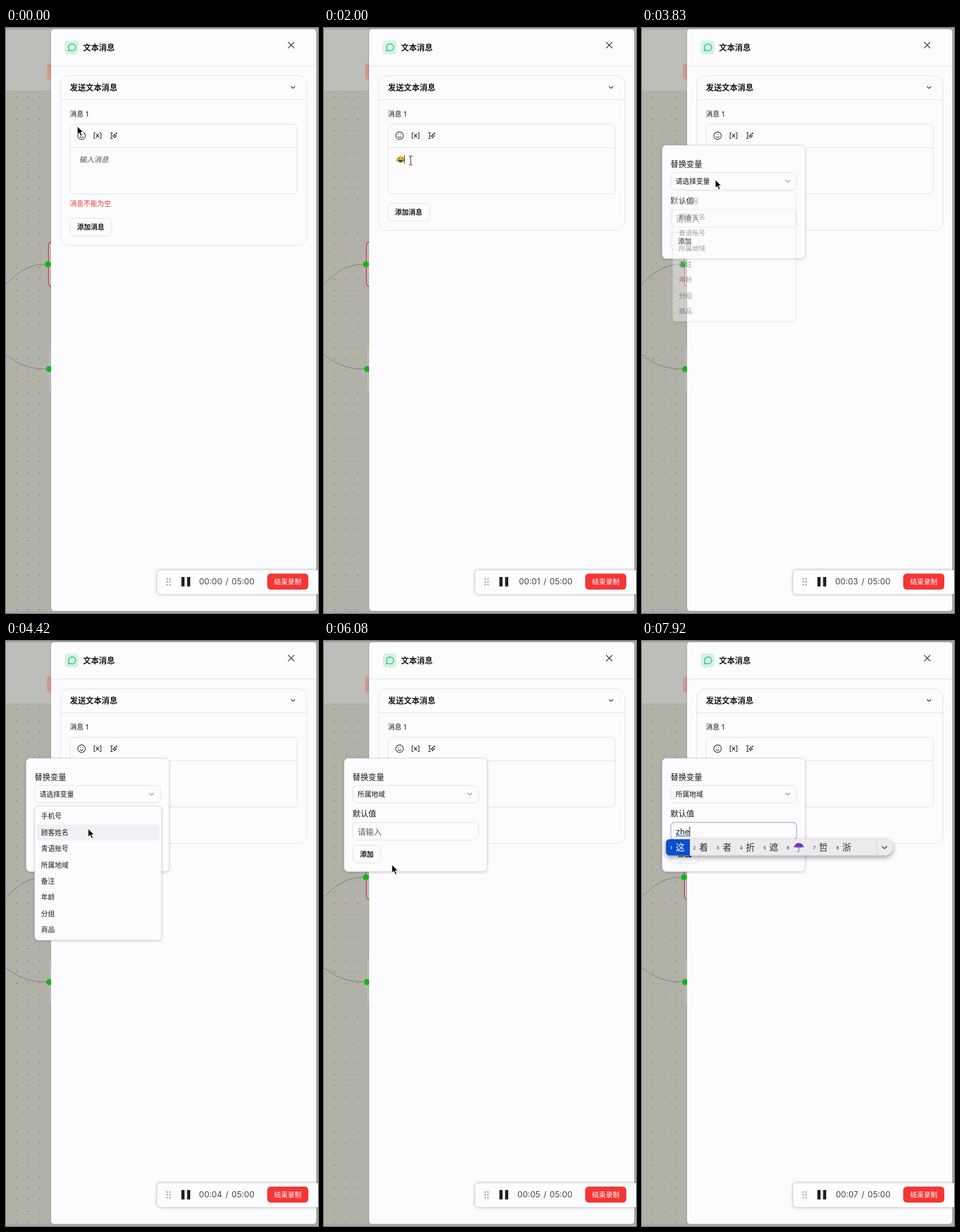
Recreate the animation shown at these times as an HTML page. Size 547x1024 px, loop 8 s.

```html
<!DOCTYPE html>
<html lang="zh">
<head>
<meta charset="utf-8">
<title>文本消息</title>
<style>
  html, body { margin: 0; width: 100%; height: 100%; overflow: hidden; background: #a9a9a9; }
  svg { display: block; width: 100vw; height: 100vh; }
  text { font-family: Inter, "Noto Sans CJK SC", "Noto Sans CJK", sans-serif; font-size: 12px; fill: #18181b; }
  .bold { font-weight: 600; }
  .mid { font-weight: 500; }
  .big { font-size: 13.9px; }
  .line { fill: none; stroke: #e0e0e7; }
  .box { fill: #fcfcfe; stroke: #dedee6; }
  .ink { fill: none; stroke: #27272a; stroke-width: 1.2; stroke-linecap: round; stroke-linejoin: round; }
  .hover { fill: #efeff3; }
  .pop { filter: drop-shadow(0 1px 2px #0003); }
  .caret { stroke: #111; }
</style>
</head>
<body>
<svg viewBox="0 0 547 1024" preserveAspectRatio="none">
  <defs>
    <clipPath id="gridClip"><rect x="56" y="219" width="134" height="200"/></clipPath>
    <clipPath id="barClip"><path d="M48 347H425.5a14.3 14.3 0 0 1 0 28.6H48a6 6 0 0 1-6-6V353a6 6 0 0 1 6-6Z"/></clipPath>
  </defs>

  <!-- canvas behind the panel -->
  <rect width="547" height="1024" fill="#a9a9a9"/>
  <rect y="3" width="82" height="106" fill="#bdbdb9"/>
  <rect y="109" width="82" height="911" fill="#b2b1a8"/>
  <rect x="72" y="62" width="10" height="28" rx="4" fill="#d0988e"/>
  <g id="dots" fill="#55554f"></g>
  <path d="M-12 459C18 432 32 413.5 72 413.5M-12 563C18 586 34 597 74 597" fill="none" stroke="#77777b"/>
  <rect x="76" y="556" width="10" height="82" rx="4" fill="#bebebb"/>
  <rect x="74.5" y="374.5" width="20" height="78" rx="6" fill="#c2c2c0" stroke="#cf2430" stroke-width="1.3"/>
  <circle cx="73.5" cy="413.5" r="5.2" fill="#0cb814"/>
  <circle cx="75.5" cy="597" r="5.2" fill="#0cb814"/>

  <!-- panel -->
  <rect x="79" y="2" width="465" height="1018.5" rx="5" fill="#fcfcfe" style="filter:drop-shadow(0 0 1px #0005)"/>
  <path class="line" d="M79 66.5H544"/>
  <rect x="103" y="22" width="24" height="24" rx="5" fill="#d2f4e3"/>
  <path d="M109.3 40.2l1-3.2a6.4 6.1 0 1 1 2.3 2.2Z" fill="none" stroke="#1fae6c" stroke-width="1.2" stroke-linejoin="round"/>
  <text class="bold big" x="135" y="39">文本消息</text>
  <path class="ink" d="M495 25l10 10m0-10l-10 10"/>

  <rect id="card" class="line" x="95.5" y="83.5" width="432" height="297" rx="15"/>
  <path class="line" d="M96 125.5H527"/>
  <text class="bold big" x="112" y="109">发送文本消息</text>
  <path class="ink" d="M500 102.5l3.2 3.2 3.2-3.2"/>
  <text x="112" y="155">消息 1</text>
  <rect class="line" x="112.5" y="168.5" width="398" height="122" rx="6"/>
  <path class="line" d="M113 209.5H510"/>
  <rect id="hoverFace" class="hover" x="120" y="176.500" width="25" height="24" rx="4"/>
  <rect id="hoverVar" class="hover" x="148" y="176.500" width="25" height="24" rx="4"/>
  <g class="ink">
    <circle cx="132.500" cy="188.500" r="6.600"/>
    <path d="M129.800 190.200q2.700 3 5.400 0M130.500 186.400v.2M134.500 186.400v.2"/>
    <path d="M156.500 183.500h-2v10h2M164.500 183.500h2v10h-2M158.300 186l4.400 5M162.700 186l-4.400 5"/>
    <path d="M183 183.500h4M183 193.500h4M185 183.500v10M190.500 185.500q.5 3 3.500 3.500q-3 .5-3.500 3.500q-.5-3-3.500-3.500q3-.5 3.500-3.500ZM193.500 183.300v2.400M192.300 184.500h2.400"/>
  </g>
  <text id="hint" x="128" y="235" font-style="italic" style="font-size:13px;fill:#55555c">输入消息</text>
  <g id="sent" transform="translate(134.300 230.200)"></g>
  <path id="caretA" class="caret" d="M0 222.500v15"/>
  <text id="error" x="112" y="312" style="fill:#ee2f2f">消息不能为空</text>
  <g id="addRow">
    <rect class="box" x="112.500" y="333" width="73" height="31" rx="7"/>
    <text class="bold" x="124.500" y="353">添加消息</text>
  </g>

  <g id="tip">
    <rect x="-15.500" y="151" width="31" height="24.500" rx="4" fill="#26262a"/>
    <text id="tipText" class="mid" y="167.500" text-anchor="middle" style="font-size:11px;fill:#fff">变量</text>
  </g>

  <!-- emoji picker -->
  <g id="picker">
    <rect class="box pop" x="44.500" y="205.500" width="176" height="228" rx="7"/>
    <rect id="cell" width="24" height="24" rx="4" fill="#e2e2e5"/>
    <g id="grid" clip-path="url(#gridClip)"></g>
    <path class="line" d="M191.500 220V419M206.500 220V419" stroke-width=".8"/>
    <rect x="195" y="225" width="8" height="82" rx="4" fill="#68686a"/>
  </g>

  <!-- variable form -->
  <g id="form">
    <rect class="box pop" x="35.500" y="205.500" width="250.500" height="198" rx="7"/>
    <text class="mid big" x="50" y="243">替换变量</text>
    <rect class="box" x="50.500" y="253" width="220.500" height="30.500" rx="7"/>
    <text id="choice" x="59" y="273">请选择变量</text>
    <path class="ink" d="M252 266.500l3.400 3.400 3.400-3.400" style="stroke:#8a8a90"/>
    <text class="mid big" x="50" y="307">默认值</text>
    <rect id="field" class="box" x="50.500" y="317.500" width="220.500" height="31" rx="7"/>
    <text id="ask" x="59" y="338.500" style="font-size:14px;fill:#5d5d66">请输入</text>
    <text id="typed" x="59" y="338.500" style="font-size:14px"></text>
    <path id="under" d="M59 341.300h0" stroke="#2a66e0" stroke-width="1.400"/>
    <path id="caretB" class="caret" d="M0 325v17"/>
    <rect class="box" x="50.500" y="357.500" width="49" height="31" rx="7"/>
    <text class="bold" x="63" y="377.500">添加</text>
  </g>

  <g id="list">
    <rect class="box pop" x="50.500" y="289" width="222" height="234.500" rx="6"/>
    <rect id="row" x="54" width="215" height="28" rx="4" fill="#f1f1f5"/>
  </g>

  <!-- input method bar -->
  <g id="ime">
    <g style="filter:drop-shadow(0 3px 5px #0006)">
      <g clip-path="url(#barClip)">
        <rect x="42" y="347" width="398" height="29" fill="#ebebed"/>
        <rect x="42" y="347" width="42" height="29" fill="#0a4fcd"/>
      </g>
    </g>
    <path d="M411.500 347V376" stroke="#d6d6d8"/>
    <path class="ink" d="M421 359.500l4.200 4 4.200-4"/>
  </g>

  <!-- recorder -->
  <rect x="265" y="949" width="300" height="42" rx="6" fill="#fdfdff" style="filter:drop-shadow(0 0 2.500px #5558)"/>
  <path d="M282.500 964.500v.01M287.500 964.500v.01M282.500 969.500v.01M287.500 969.500v.01M282.500 974.500v.01M287.500 974.500v.01" stroke="#55555a" stroke-width="2" stroke-linecap="round"/>
  <path d="M307.500 961h5.500v16.500h-5.500ZM317.500 961h5.500v16.500h-5.500Z" fill="#1f1f23"/>
  <g style="--c:#47474c" text-anchor="end">
    <text id="clock" x="379" y="974" style="font-size:14.400px;fill:var(--c)">00:00</text>
    <text x="390" y="974" style="font-size:14.400px;fill:var(--c)">/</text>
    <text x="435.500" y="974" style="font-size:14.400px;fill:var(--c)">05:00</text>
  </g>
  <rect x="458" y="955" width="72" height="28" rx="6" fill="#f43636"/>
  <text class="mid" x="470" y="973.500" style="fill:#fff">结束录制</text>

  <g id="cursor" stroke-linejoin="round">
    <path id="arrow" d="M0 0V14.500L3.400 11.500 6 17.300 8.500 16.200 6 10.500H10.600Z" fill="#050505" stroke="#fff"/>
    <path id="hand" d="M-1.800 1.300Q-1.300-.7 .4-.2Q1.400 .2 1.700 1.700L2.700 6Q4 4.700 5 6.300Q6.700 5.400 7.300 7.100Q9 6.600 9.500 8.600L10 12Q10 14 8.600 17H1.500Q-.8 13.500-4.300 11.200Q-5.500 9.300-3.400 8.700Q-2 8.600-.4 9.900ZM3.400 11v3.500M5.500 11v3.500M7.500 11v3.500" fill="#fff" stroke="#111" stroke-width="1.100"/>
    <g id="beam" fill="none">
      <path d="M-3-8Q0-8 0-6Q0-8 3-8M0-6V6M-3 8Q0 8 0 6Q0 8 3 8" stroke="#fff" stroke-width="2.400"/>
      <path d="M-3-8Q0-8 0-6Q0-8 3-8M0-6V6M-3 8Q0 8 0 6Q0 8 3 8" stroke="#111"/>
    </g>
  </g>
</svg>

<script>
const $ = id => document.getElementById(id);
const add = (id, markup) => $(id).insertAdjacentHTML('beforeend', markup);
const show = (id, on) => $(id).style.display = on ? '' : 'none';

// small drawing helpers
const fill = (d, c) => `<path d="${d}" fill="${c}"/>`;
const stroke = (d, c = '#5d3513', w = 1.1) =>
  `<path d="${d}" fill="none" stroke="${c}" stroke-width="${w}" stroke-linecap="round"/>`;
const dot = (x, y, r, c) => `<circle cx="${x}" cy="${y}" r="${r}" fill="${c}"/>`;
const face = (extra, c = '#fcc433') => dot(0, 0, 6.6, c) + extra;
const eyes = stroke('M-2.400-1.800v.6M2.400-1.800v.6', undefined, 1.700);
const grin = fill('M-4 .8H4Q3.400 4.800 0 4.800T-4 .8Z', '#6b3514');
const smile = stroke('M-3 2Q0 5 3 2');
const frown = stroke('M-2.500 4Q0 1.500 2.500 4');
const hand = (turn, fingers) => `<g transform="rotate(${turn})">` + stroke(fingers, '#f9ba2c', 2.500) +
  '<rect x="-4" y="-1.500" width="8" height="7.500" rx="3" fill="#fdbf35"/>' +
  stroke('M-2 2.500Q1 .5 3 2.500', '#d88b18', .9) + '</g>';
const four = 'M-3 0V-4.600M-1 0V-6M1 0V-5.800M3 0V-4.400';
const point = 'M-1.500 0V-6';
const knuckles = 'M-3-1.500V-2M-1-2V-2.600M1-2V-2.600M3-1.500V-2';

const emoji = [
  face(stroke('M-4-1.500Q-2.700-3.400-1.400-1.500M1.400-1.500Q2.700-3.400 4-1.500') + grin + dot(-5.5, 1.2, 1.9, '#43a9ee') + dot(5.5, 1.2, 1.9, '#43a9ee')),
  face(dot(-3, -2, 2.3, '#ee2f3f') + dot(3, -2, 2.3, '#ee2f3f') + grin),
  face(eyes + smile + dot(-5, 2.5, 2, '#f0475c') + dot(4.5, 4, 2, '#f0475c') + dot(4, -5, 2, '#f0475c')),
  face(fill('M-6.500-3H6.500L5 .8H1.200L0-1.500-1.200 .8H-5Z', '#222') + smile),
  face(dot(-3, -1.8, 2.3, '#e8612c') + dot(3, -1.8, 2.3, '#e8612c') + grin),
  face(stroke('M-4-1.500h2.500M1.500-1.500h2.500') + fill('M-1.600 1.500h3.200v3.500h-3.200Z', '#6b3514') + stroke('M-3.300 0V5.500M3.300 0V5.500', '#43a9ee', 2)),
  face(stroke('M-4-2.500L-1.500-1M4-2.500L1.500-1') + eyes + frown, '#f1592a'),
  face(eyes + dot(0, 3, 1.6, '#6b3514') + fill('M-6-3Q-7-7-3-6.500Q0-9 3-6.500Q7-7 6-3L3-4 0-2.500-3-4Z', '#b06a3c')),
  face(eyes + fill('M-3.500 1.500h7v2.500h-7Z', '#fff') + dot(0, -5, 2, '#b9e4ff'), '#4ba5ee'),
  face(fill('M-6-2.500A6.500 6.500 0 0 1 6-2.500Z', '#5a83d6') + dot(-2.5, -1, 1.5, '#fff') + dot(2.5, -1, 1.5, '#fff') + dot(0, 3.5, 1.8, '#6b3514') + stroke('M-5.500 2V6M5.500 2V6', '#e9a11e', 2)),
  face(stroke('M-4-2.500l2.400 .8M1.500-1.500h2') + dot(-4, 2, 1.6, '#f08a5a') + dot(4, 2, 1.6, '#f08a5a') + stroke('M-2.500 3.500q1.500-2 2.500 0t2.500 0')),
  face(fill('M-6-2L-6.500-7.500-2-5.500ZM6-2L6.500-7.500 2-5.500Z', '#7a3f9e') + stroke('M-4-2.500L-1.500-1M4-2.500L1.500-1', '#35134d') + stroke('M-3 2Q0 5 3 2', '#35134d'), '#8e4fb5'),
  fill('M-4.500 6V-2A4.500 4.500 0 0 1 4.500-2V6L2 4.500 0 6.500-2 4.500Z', '#d5d5dc') + stroke('M-4 1l-2-1.500M4 1l2-1.500', '#d5d5dc', 2) + dot(-1.6, -2, 1, '#333') + dot(1.6, -2, 1, '#333') + dot(0, 1.5, 1.5, '#a33'),
  fill('M0-6.500Q6-6.500 5.500-1 5 4 0 6.500-5 4-5.500-1-6-6.500 0-6.500Z', '#a5b3b0') + fill('M-4.500-1.500Q-1-1-1 2-4 2-4.500-1.500ZM4.500-1.500Q1-1 1 2 4 2 4.500-1.500Z', '#151515'),
  '<rect x="-5.500" y="-4.500" width="11" height="10.500" rx="2.500" fill="#6d9a9c"/>' + dot(0, -5.5, 1.5, '#d0524a') + dot(-2.5, -1, 1.5, '#e9f6f5') + dot(2.5, -1, 1.5, '#e9f6f5') + fill('M-3 2.500h6v1.500h-6Z', '#304a4c'),
  hand(-30, four) + stroke('M-5-5l-1-1M0-6.500V-7M4-5.500l1-1', '#555', .8),
  hand(0, 'M-1.500 0L.5-5.600'), hand(180, 'M1.500 0L-.5-5.600'), hand(0, knuckles), hand(10, knuckles),
  hand(90, knuckles), hand(0, 'M-1 0L1-6M1 0L-.5-5.500'), hand(0, 'M-1.500 0L-3-6M1.500 0L3-6'),
  hand(10, 'M-3 0V-6M3 0V-5M-4 3L-6 1'), hand(0, 'M-3 0V-6M3 0V-5.500'),
  hand(-90, point), hand(90, point), hand(0, point), hand(180, point), hand(12, point),
  hand(0, four), hand(0, 'M-3 0L-4.500-4.500M-1 0L-1.500-6M1 0L1.500-6M3 0L5-4.500M-4 3L-6 1'),
  hand(0, 'M-3 0L-4-4.500M-1 0L-2.500-6M1 0L2.500-6M3 0L4-4.500'),
  hand(-25, four + 'M-4 3L-6 1'), hand(15, 'M-3 0L-5-4M4 1L6-3'),
  stroke('M-3.500-4.500L-4.500 2.500H4', '#55595f', 4), stroke('M-2-4L1 0V5', '#666a70', 2.800),
  stroke('M-2-4L1.500 0 0 5', '#f7b42c', 3), hand(0, 'M-2 0V-3M2 0V-3'),
  fill('M-6 2Q-7-3-3-4.500 2-7 5.500-2.500 8 2 4 3.500-2 5-6 2Z', '#ea8da0') + stroke('M-3-2Q0-4 1-1T4 0M-4 1Q-1 0 1 2', '#c9637a', .8)
];
const at = (x, y, markup) => `<g transform="translate(${x} ${y})">${markup}</g>`;
const cellX = i => 71 + i % 5 * 26.5, cellY = i => 233 + Math.floor(i / 5) * 26;
emoji.forEach((e, i) => add('grid', at(cellX(i), cellY(i), e)));
add('sent', emoji[0]);

for (let x = 18.5; x < 78; x += 20.2)
  for (let y = 120; y < 1020; y += 19.95) add('dots', `<circle cx="${x}" cy="${y}" r=".8"/>`);

const rowY = i => 307 + i * 28.4;
['手机号', '顾客姓名', '青语账号', '所属地域', '备注', '年龄', '分组', '商品'].forEach((s, i) =>
  add('list', `<text x="61.500" y="${rowY(i) + 4.4}">${s}</text>`));

const umbrella = fill('M-8.500 1A8.500 8.500 0 0 1 8.500 1L5.500-.5 2.500 1 0-.5-2.500 1-5.500-.5Z', '#7a35c9') + stroke('M0-1V6q0 2-2.500 1.500', '#777', 1.2);
const slots = [67, 108, 149, 190, 231, 275, 318, 359];
[...'这着者折遮伞哲浙'].forEach((s, i) => {
  const x = slots[i], c = i ? '#333' : '#fff', gap = i === 5 ? 19 : 16;
  add('ime', `<text x="${x - gap}" y="364.500" text-anchor="middle" style="font-size:8px;fill:${c}">${i + 1}</text>` +
    (i === 5 ? at(x, 361, umbrella) : `<text x="${x}" y="367" text-anchor="middle" style="font-size:16px;fill:${c}">${s}</text>`));
});

// [ms, value]: hold each value until the next time
const clock = [[0, 0], [1250, 1], [2250, 2], [3250, 3], [4250, 4], [5250, 5], [6250, 6], [7170, 7]];
const tipFade = [[0, 0], [500, .4], [580, .8], [670, 1], [830, .5], [920, 0], [2830, .4], [2920, .8], [3000, 1], [3420, .4], [3500, 0]];
const pickerFade = [[0, 0], [830, .5], [920, 1], [1830, .6], [1920, 0]];
const formFade = [[0, 0], [3420, .4], [3500, .8], [3580, 1]];
const listFade = [[0, 0], [3830, .38], [3920, 1], [6080, 0]];
const cells = [[0, -1], [1250, 1], [1330, 6], [1580, 0]];
const rows = [[0, -1], [4170, 0], [4330, 1], [5330, 2], [5670, 3]];
const caretA = [[0, 0], [170, 128.5], [830, 0], [2000, 141], [2250, 0], [2830, 141], [3250, 0]];
const typing = [[0, ''], [7670, 'z'], [7830, 'zh'], [7920, 'zhe']];
const shapes = [[0, 'arrow'], [420, 'hand'], [1080, 'arrow'], [1250, 'hand'], [1920, 'arrow'], [2000, 'beam'],
  [2420, 'arrow'], [2580, 'hand'], [3750, 'arrow'], [6500, 'beam'], [7670, '']];
// [ms, x, y]: straight moves between places
const path = [[0, 125, 172], [83, 119, 156], [167, 121, 165], [250, 125, 181], [333, 125, 181], [420, 128, 184], [670, 132, 184],
  [1000, 132, 184], [1083, 125, 198], [1250, 100, 230], [1333, 90, 245], [1417, 86, 240], [1500, 86, 240], [1667, 72, 234],
  [1833, 72, 234], [2000, 152, 232], [2083, 152, 232], [2250, 205, 216], [2333, 205, 216], [2420, 192, 203], [2667, 162, 191],
  [3667, 162, 191], [3750, 142, 242], [3833, 128.5, 265.5], [4000, 128.5, 265.5], [4417, 144, 328.5], [4667, 144, 328.5],
  [5083, 130, 341], [5167, 130, 341], [6000, 119, 391.5], [6083, 119, 391.5], [6833, 93.5, 334], [6917, 93.5, 334], [7167, 97, 337]];

const hold = (list, t) => list.filter(k => k[0] <= t).pop()[1];
function place(t) {
  const i = path.findIndex(k => k[0] > t);
  if (i < 0) return path[path.length - 1].slice(1);
  const [a, b] = [path[i - 1], path[i]], p = (t - a[0]) / (b[0] - a[0]);
  return [1, 2].map(n => a[n] + (b[n] - a[n]) * p);
}
function fade(id, v, cx, cy, dy = 0) {
  const s = .95 + .05 * v;
  show(id, v > 0);
  $(id).setAttribute('opacity', v);
  $(id).setAttribute('transform', `translate(${cx * (1 - s)} ${cy * (1 - s) + dy * (1 - v)}) scale(${s})`);
}
function caret(id, x) {
  show(id, x > 0);
  $(id).setAttribute('transform', `translate(${x} 0)`);
}

function draw(ms) {
  const step = Math.floor((ms + 4) / (1000 / 12)) * 1000 / 12, t = step + 4;
  const done = t >= 1830, chosen = t >= 6080, focus = t >= 6830, word = hold(typing, t);

  $('clock').textContent = '00:0' + hold(clock, t);
  $('card').setAttribute('height', done ? 271 : 297);
  $('addRow').setAttribute('transform', `translate(0 ${done ? -26 : 0})`);
  show('error', !done);
  show('hint', !done);
  show('sent', done);
  show('hoverFace', t >= 420 && t < 1080);
  show('hoverVar', t >= 2580 && t < 3580);
  caret('caretA', hold(caretA, t));

  const tip = hold(tipFade, t);
  show('tip', tip > 0);
  $('tip').setAttribute('opacity', tip);
  $('tip').setAttribute('transform', `translate(${done ? 160.5 : 132.5} ${-4 * (1 - tip)})`);
  $('tipText').textContent = done ? '变量' : '表情';

  fade('picker', hold(pickerFade, t), 132, 205);
  const cell = hold(cells, t);
  show('cell', cell >= 0);
  $('cell').setAttribute('x', cellX(cell) - 12);
  $('cell').setAttribute('y', cellY(cell) - 12);

  fade('form', hold(formFade, t), 160, 205);
  $('choice').textContent = chosen ? '所属地域' : '请选择变量';
  $('field').style.cssText = focus ? 'stroke:#c3c3cf;stroke-width:2' : '';
  show('ask', !word);
  $('typed').textContent = word;
  const w = word ? $('typed').getComputedTextLength() : 0;
  $('under').setAttribute('d', `M59 341.300h${w}`);
  caret('caretB', focus && (t < 7330 || word) ? 59.5 + w : 0);

  fade('list', hold(listFade, t), 161, 406, -11);
  const row = hold(rows, t);
  show('row', row >= 0);
  $('row').setAttribute('y', rowY(row) - 14);
  show('ime', t >= 7750);

  const shape = hold(shapes, t);
  ['arrow', 'hand', 'beam'].forEach(s => show(s, s === shape));
  $('cursor').setAttribute('transform', `translate(${place(step)})`);
}

const start = performance.now();
function tick(now) {
  draw(Math.max(0, now - start) % 8000);
  requestAnimationFrame(tick);
}
draw(0);
requestAnimationFrame(tick);
</script>
</body>
</html>
```
